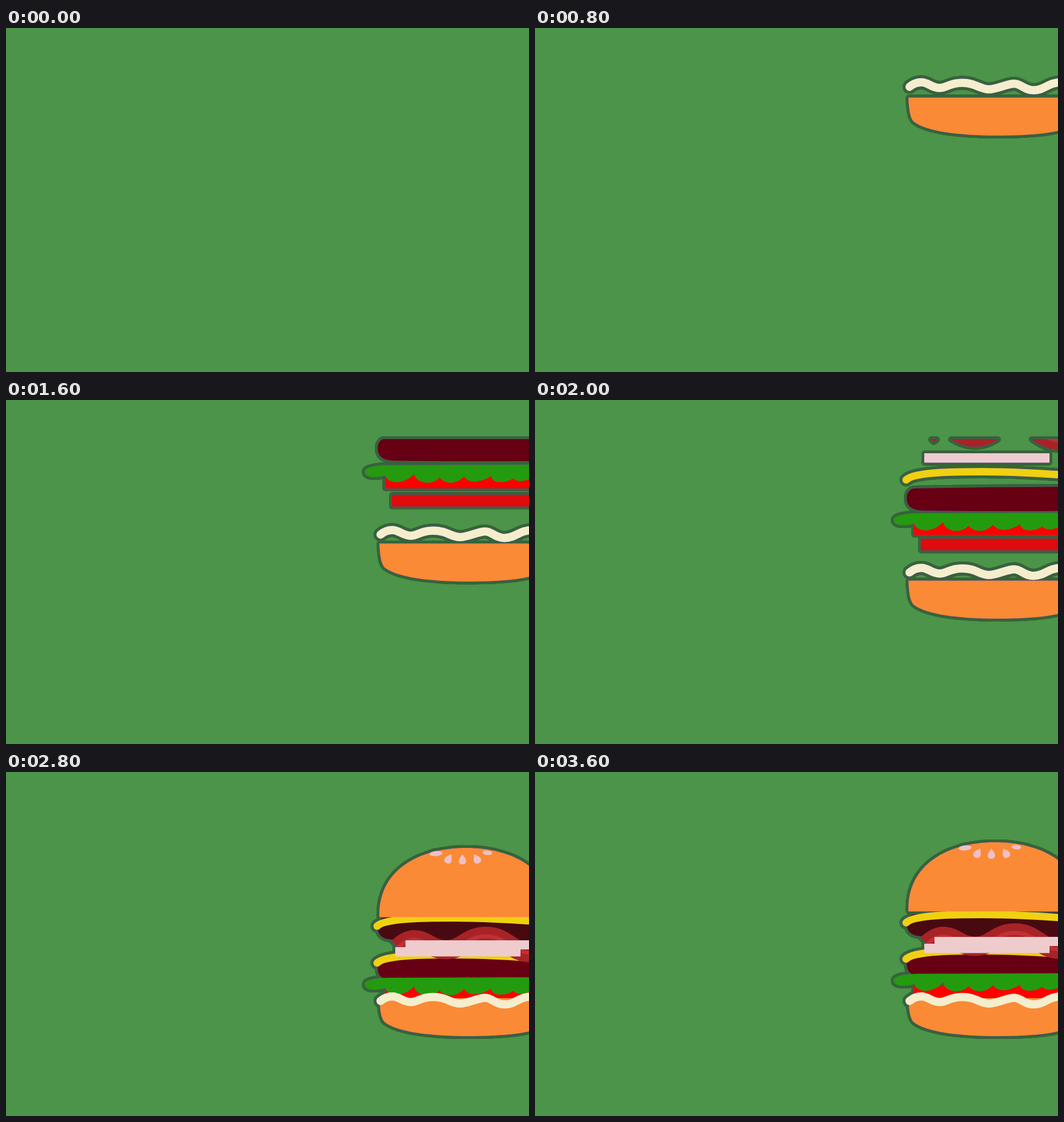
Recreate the animation shown at these times as an HTML page with a canvas. Size 923 px wide and 607 px high, loop 3.7 s.

```html
<!DOCTYPE html>
<html lang="en">
<head>
<meta charset="utf-8">
<title>Burger stack</title>
<style>
  html, body { margin: 0; width: 100%; height: 100%; overflow: hidden; background: #4b9449; }
  canvas { display: block; }
</style>
</head>
<body>
<canvas id="stage" width="923" height="607"></canvas>
<script>
const W = 923, H = 607, PAD = 40;
const STEP = 100, STEPS = 37;
const TOP = 69;      // ingredients appear below this line
const LANDED = 28, LAST = 36;
const OUTLINE = '#376639', FRINGE = '#5a4a86';

const cheese = 'M655 0 C668 -14 740 -14.5 790 -14.5 C840 -14.5 890 -12 970 -6';
const patty = 'M685 0 C664 0 656 -9 656 -22 C656 -32 662 -39 671 -39 L800 -41 L975 -42 V0 Q800 2 685 0Z';
const bacon = 'M692 11 C704 0 712 -3 720 -3 C742 -3 750 14.5 776 14.5 ' +
  'C808 14.5 812 -9 847 -9 C885 -9 890 20 928 20 C950 20 960 8 975 0';
const mayo = 'M661 0 C668 -6 674 -8 682 -8 C694 -8 700 2 714 2 C728 2 730 -7 754 -7 ' +
  'C778 -7 785 4.5 801 4.5 C816 4.5 832 -5.5 846 -5.5 C858 -5.5 863 6 880 6 C900 6 905 -8 930 -8 C945 -8 955 2 970 2';
const lettuce = 'M633 0 C633 6 640 9 650 9 C658 9 664 8 669 6 C673 17 686 19 694 18 C706 15 714 11 720 3 ' +
  'C722 14 734 19 743 19 C752 19 760 16 765 10 C771 17 778 19 786 19 C796 18 803 14 808 8 ' +
  'C815 16 822 18 830 17 C842 15 851 11 856 7 C857 15 864 18 873 18 C882 18 890 15 895 11 ' +
  'C900 16 906 17 912 16 C918 15 924 13 930 9 C940 18 950 12 990 6 V-13 L680 -12 C655 -12 633 -9 633 0Z';
const lowerBun = 'M659 0 H965 C965 20 961 36 955 43 C940 62 880 67 815 67 C750 67 690 60 668 42 C661 34 660 18 659 0Z';
const upperBun = 'M659 0 C656 -80 725 -122 812 -122 C899 -122 968 -80 965 0Z';

const box = (x, w, h) => `M${x} 0 h${w} v${h} h${-w}Z`;
const part = (d, color, width = 0) => ({ path: new Path2D(d), color, width });

// y: height at step 24, speed: px per step, pressed: landing height, rest: final height
const layer = (y, speed, pressed, rest, ...parts) => ({ y, speed, pressed, rest, parts });

const seedColor = '#efc0c6';
const drop = (x, y, deg) => {
  const path = new Path2D();
  const turn = new DOMMatrix().translate(x, y).rotate(deg);
  path.addPath(new Path2D('M0 0 C3 5 6.5 8 6.5 12 C6.5 16 4 18 0 18 C-4 18 -6.5 16 -6.5 12 C-6.5 8 -3 5 0 0Z'), turn);
  return { path, color: seedColor, width: 0 };
};
const flatSeed = (x, y, rx, ry, tilt) => {
  const path = new Path2D();
  path.ellipse(x, y, rx, ry, tilt, 0, 2 * Math.PI);
  return { path, color: seedColor, width: 0 };
};

// back to front
const layers = [
  layer(322, 19.3, 379, 379, part(box(681, 290, 20.5), '#de0c0c')),
  layer(298, 20.5, 378, 378, part(box(669, 300, 22), '#ff0000')),
  layer(283, 22, 368, 361, part(patty, '#660012')),
  layer(297, 21.25, 375, 368, part(lettuce, '#249b0e')),
  layer(245, 26, 337, 330, part(cheese, '#f0d010', 13)),
  layer(93, 51, 296, 290, part(patty, '#480a10')),
  layer(183, 33, 299, 293, part(bacon, '#a82326', 34), part(bacon, '#c03035', 7)),
  layer(209, 28.75, 309, 303, part(box(687, 221, 16.5), '#eeccce')),
  layer(140, 40, 297, 291, part(box(705, 260, 16), '#eeccce')),
  layer(56, 54, 272, 266, part(cheese, '#f0d010', 13)),
  layer(48, 52, 256, 246, part(upperBun, '#fa8a35'),
    flatSeed(759, -112, 11.5, 4.5, -0.08), flatSeed(849.5, -113.5, 8.5, 4, 0.1),
    drop(786, -111, 30), drop(805.5, -111, 0), drop(826, -111, -30)),
  layer(384, 16.33, 399, 399, part(lowerBun, '#fa8a35')),
  layer(371, 16.7, 404, 404, part(mayo, '#f4eecd', 14.5))
];

const makeLayer = () => {
  const canvas = document.createElement('canvas');
  canvas.width = W + PAD;
  canvas.height = H;
  return canvas.getContext('2d');
};
const stage = document.getElementById('stage').getContext('2d');
const food = makeLayer(), tint = makeLayer();

function heightAt(l, step) {
  if (step <= LANDED) return Math.min(l.y + l.speed * (step - 24), l.pressed);
  return l.pressed + (l.rest - l.pressed) * (step - LANDED) / (LAST - LANDED);
}

function drawFood(step) {
  food.clearRect(0, 0, W + PAD, H);
  food.save();
  food.beginPath();
  food.rect(0, TOP, W + PAD, H);
  food.clip();
  food.lineJoin = 'round';
  for (const l of layers) {
    food.save();
    food.translate(0, heightAt(l, step));
    for (const { path, color, width } of l.parts) {
      food.fillStyle = food.strokeStyle = color;
      food.lineWidth = width;
      food.lineCap = width < 20 && width !== 7 ? 'round' : 'butt';
      if (width) food.stroke(path); else food.fill(path);
    }
    food.restore();
  }
  food.restore();
}

// grows the silhouette of all the food by a radius
function drawHalo(color, radius, count) {
  tint.globalCompositeOperation = 'copy';
  tint.drawImage(food.canvas, 0, 0);
  tint.globalCompositeOperation = 'source-in';
  tint.fillStyle = color;
  tint.fillRect(0, 0, W + PAD, H);
  for (let i = 0; i < count; i++) {
    const a = 2 * Math.PI * i / count;
    stage.drawImage(tint.canvas, radius * Math.cos(a), radius * Math.sin(a));
  }
}

function draw(step) {
  stage.fillStyle = '#4b9449';
  stage.fillRect(0, 0, W, H);
  if (!step) return;
  drawFood(step);
  drawHalo(OUTLINE, 5, 32);
  drawHalo(OUTLINE, 2.5, 12);
  drawHalo(FRINGE, 0.6, 4);
  stage.drawImage(food.canvas, 0, 0);
}

let shown = -1;
function tick() {
  const step = Math.floor(performance.now() / STEP) % STEPS;
  if (step !== shown) draw(shown = step);
  requestAnimationFrame(tick);
}
tick();
</script>
</body>
</html>
```
